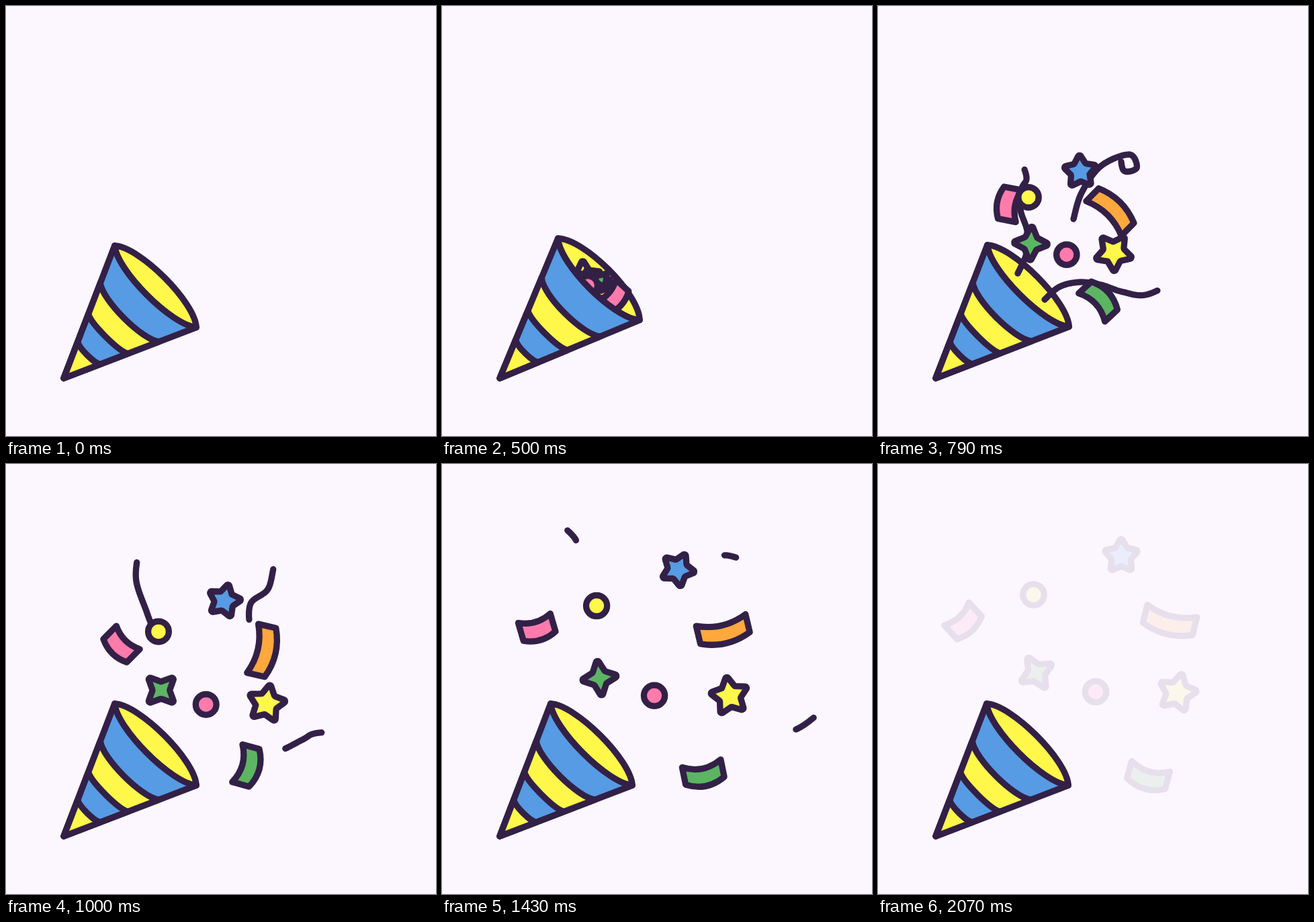
Write an HTML page with a canvas that moves like this. It is 640 px wide and 640 px high and loops after 2.14 s.

```html
<!DOCTYPE html>
<html lang="en">
<head>
<meta charset="utf-8">
<title>Party popper</title>
<style>
html, body { margin: 0; width: 100%; height: 100%; overflow: hidden; background: #fcf7ff; }
canvas { display: block; width: 100vmin; height: 100vmin; }
</style>
</head>
<body>
<canvas id="stage" width="640" height="640"></canvas>
<script>
const ctx = document.getElementById('stage').getContext('2d');
const LOOP = 2140, STEPS = 30, LINE = 9.3;
const BURST = 7, REST = 29;
const BG = [252, 247, 255], INK = [51, 32, 71];
const YELLOW = [255, 247, 74], BLUE = [86, 155, 227];
const PINK = [255, 123, 172], GREEN = [92, 181, 98], ORANGE = [255, 168, 61];

const clamp = v => Math.max(0, Math.min(1, v));
const lerp = (a, b, t) => a + (b - a) * t;

// Ease-out on a Bezier curve with handles (0, lift) and (pull, 1)
function easeOut(t, lift, pull) {
  t = clamp(t);
  let lo = 0, hi = 1;
  for (let i = 0; i < 24; i++) {
    const s = (lo + hi) / 2;
    if (3 * pull * s * s * (1 - s) + s ** 3 < t) lo = s; else hi = s;
  }
  return 3 * lift * lo * (1 - lo) ** 2 + 3 * lo * lo * (1 - lo) + lo ** 3;
}

const travel = k => easeOut((k - BURST) / (REST - BURST), .44, .29);
const reach = k => easeOut((k - BURST - 1) / 15, .25, .3);
const opacity = k => clamp(1 - (k - 23.8) * .172);

// Squash, stretch, settle
const coneKeys = [[0, 1], [4, .89], [7, 1.08], [12, 1], [STEPS, 1]];
function coneStretch(k) {
  const i = coneKeys.findIndex(key => key[0] > k);
  const [a, from] = coneKeys[i - 1], [b, to] = coneKeys[i];
  return lerp(from, to, (1 - Math.cos(Math.PI * (k - a) / (b - a))) / 2);
}

const mix = (c, a) => `rgb(${c.map((v, i) => Math.round(lerp(BG[i], v, a)))})`;

function paint(fill, alpha) {
  if (fill) {
    ctx.fillStyle = mix(fill, alpha);
    ctx.fill();
  }
  ctx.strokeStyle = mix(INK, alpha);
  ctx.stroke();
}

const star = (points, outer, inner) => () => {
  const corner = i => {
    const r = i % 2 ? inner : outer, a = Math.PI * i / points;
    return [r * Math.sin(a), -r * Math.cos(a)];
  };
  ctx.moveTo(...corner(-1));
  for (let i = 0; i < points * 2; i++) ctx.arcTo(...corner(i), ...corner(i + 1), 2.5);
  ctx.closePath();
};

const band = (w, h, sag) => () => {
  const x = w / 2, y = h / 2;
  ctx.moveTo(-x, -y);
  ctx.quadraticCurveTo(0, 2 * sag - y, x, -y);
  ctx.lineTo(x, y);
  ctx.quadraticCurveTo(0, 2 * sag + y, -x, y);
  ctx.closePath();
};

const dot = () => ctx.arc(0, 0, 15.7, 0, 7);

// turn: resting angle, spin: rotation made on the way, bend: sideways bow of the path
const pieces = [
  { draw: star(5, 27.5, 15), fill: BLUE, start: [211, 408], end: [362, 137], turn: 0, spin: 350 },
  { draw: band(76, 27.5, 8), fill: ORANGE, start: [214, 417], end: [434.5, 232], turn: 14, spin: -370 },
  { draw: star(5, 31, 16.5), fill: YELLOW, start: [211, 406], end: [445.5, 340.4], turn: 13.4, spin: -305 },
  { draw: band(59, 26.5, 8), fill: GREEN, start: [217, 406], end: [402.5, 462.8], turn: 15.7, spin: -368 },
  { draw: band(50, 28, 6), fill: PINK, start: [253, 433], end: [126.5, 233.5], turn: -42.6, spin: 355, bend: 78 },
  { draw: star(4, 29, 13), fill: GREEN, start: [215, 416], end: [236, 310.8], turn: -30, spin: 305 },
  { draw: dot, fill: YELLOW, start: [213, 418], end: [231.5, 194.5], turn: 0, spin: 0 },
  { draw: dot, fill: PINK, start: [217, 416], end: [324, 339], turn: 0, spin: 0 }
];

function drawPiece({ draw, fill, start, end, turn, spin, bend = 0 }, k) {
  const t = travel(k), away = 1 - t, bow = bend * t * away, size = 1 - .08 * away;
  ctx.save();
  ctx.translate(lerp(start[0], end[0], t) + bow, lerp(start[1], end[1], t) - bow);
  ctx.rotate((turn + spin * away) * Math.PI / 180);
  ctx.beginPath();
  ctx.save();
  ctx.scale(size, size);
  draw();
  ctx.restore();
  paint(fill, opacity(k));
  ctx.restore();
}

const ribbons = [
  [[208, 398], [221, 368], [222, 335], [212, 303], [214, 272], [221, 255],
    [210, 222], [194, 175], [196, 137], [200, 115], [184, 96]],
  [[291, 317], [303, 278], [332, 238], [374, 221], [385, 241], [365, 244],
    [364, 208], [390, 186], [401, 147], [419, 136], [441, 140]],
  [[248, 437], [270, 418], [300, 411], [332, 415], [362, 425], [398, 430],
    [440, 411], [456, 402], [478, 399], [524, 396], [558, 374]]
];

// Point on a smooth curve through pts
function along(pts, f) {
  const last = pts.length - 1, u = f * last, i = Math.min(Math.floor(u), last - 1), t = u - i;
  const a = pts[Math.max(i - 1, 0)], b = pts[i], c = pts[i + 1], d = pts[Math.min(i + 2, last)];
  return [0, 1].map(n => b[n] + .5 * t * (c[n] - a[n]
    + t * (2 * a[n] - 5 * b[n] + 4 * c[n] - d[n] + t * (3 * (b[n] - c[n]) + d[n] - a[n]))));
}

// The tail follows the head three steps later
function drawRibbon(pts, k) {
  const head = reach(k), tail = reach(k - 3);
  if (head - tail < .001) return;
  ctx.beginPath();
  for (let i = 0; i <= 100; i++) ctx.lineTo(...along(pts, lerp(tail, head, i / 100)));
  paint(null, opacity(k));
}

// Cone space: x runs from the tip along the axis, y across it
function conePath(stretch, build) {
  ctx.save();
  ctx.translate(86, 554);
  ctx.rotate(-Math.PI / 4);
  ctx.scale(stretch, 1);
  ctx.beginPath();
  build();
  ctx.restore();
}

const RIM = 193, SPREAD = .4456;

// Arc across the cone; dir is 1 from top to bottom, -1 back again
function arc(u, sag, dir) {
  const v = u * SPREAD * dir, c = u + sag * 4 / 3;
  ctx.lineTo(u, -v);
  ctx.bezierCurveTo(c, -v * .67, c, v * .67, u, v);
}

function drawMouth(s) {
  conePath(s, () => { arc(RIM, 19, 1); arc(RIM, -18, -1); ctx.closePath(); });
  paint(YELLOW, 1);
}

const stripes = [[RIM, -18, BLUE], [138.6, -12, YELLOW], [93.3, -5.5, BLUE], [53, -4, YELLOW]];

function drawFront(s) {
  for (const [u, sag, fill] of stripes) {
    conePath(s, () => { ctx.moveTo(0, 0); arc(u, sag, 1); ctx.closePath(); });
    paint(fill, 1);
  }
}

function render(k) {
  ctx.fillStyle = mix(BG, 1);
  ctx.fillRect(0, 0, 640, 640);
  ctx.lineWidth = LINE;
  ctx.lineCap = ctx.lineJoin = 'round';
  const s = coneStretch(k);
  drawMouth(s);
  if (k >= BURST) {
    ribbons.forEach(pts => drawRibbon(pts, k));
    pieces.forEach(p => drawPiece(p, k));
  }
  drawFront(s);
}

// Poses are held for 70 ms, every seventh for 80 ms
const stepStart = k => 70 * k + 10 * Math.floor((k + 3) / 7);

function stepAt(t) {
  let k = STEPS - 1;
  while (k > 0 && stepStart(k) > t) k--;
  return k;
}

const begin = performance.now();
function tick() {
  render(stepAt((performance.now() - begin) % LOOP));
  requestAnimationFrame(tick);
}
tick();
</script>
</body>
</html>
```
